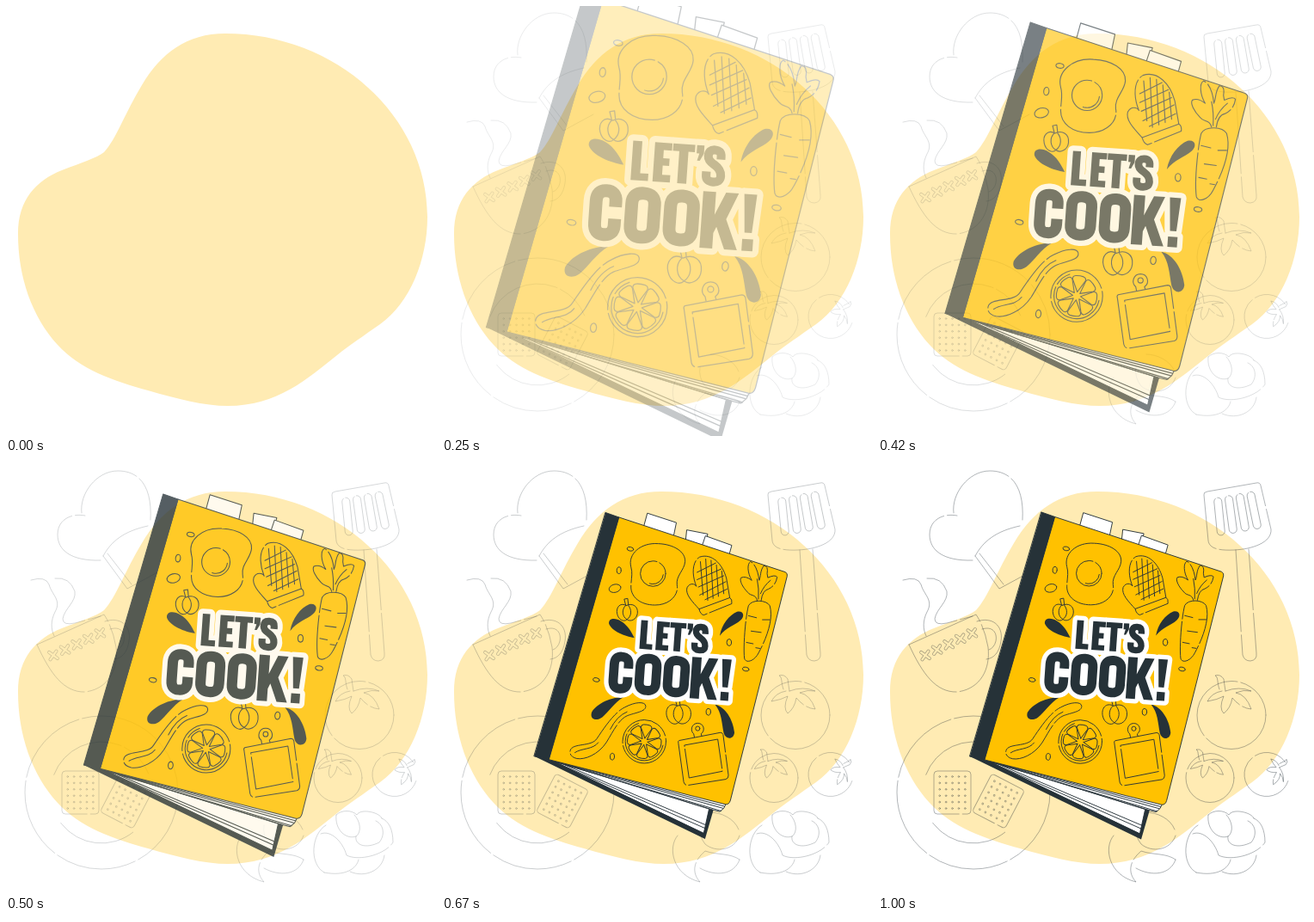
Animation of 500 by 500 pixels, one loop 1040 ms. Source, as an HTML page with a canvas:

```html
<!DOCTYPE html>
<html lang="en">
<head>
<meta charset="utf-8">
<title>Let's cook!</title>
<style>
html, body { margin: 0; width: 100%; height: 100%; overflow: hidden; background: #fff; }
canvas { display: block; width: 100vw; height: 100vh; }
</style>
</head>
<body>
<canvas id="stage" role="img" aria-label="LET'S COOK!"></canvas>
<script>
const SIZE = 500, LOOP = 1040, STEP = 1000 / 24;
const DARK = '#263238', YELLOW = '#ffc100', CREAM = '#ffebb3', WHITE = '#fff';
const CX = 257, CY = 249, BOOK_UNIT = 1.285;

const stage = document.getElementById('stage');
const view = stage.getContext('2d');
const sheet = document.createElement('canvas');
const g = sheet.getContext('2d');
let ratio = 1;

function resize() {
  ratio = Math.min(innerWidth, innerHeight) / SIZE * (window.devicePixelRatio || 1);
  stage.width = stage.height = sheet.width = sheet.height = Math.round(SIZE * ratio);
}

const cache = {};
const path = d => cache[d] || (cache[d] = new Path2D(d));
const fill = (d, color) => { g.fillStyle = color; g.fill(path(d)); };
const line = d => g.stroke(path(d));
const shape = (d, color) => { fill(d, color); line(d); };

function oval(x, y, rx, ry = rx, turn = 0, from = 0, to = Math.PI * 2) {
  g.beginPath();
  g.ellipse(x, y, rx, ry, turn, from, to);
  g.stroke();
}

function at(x, y, scale, turn, draw) {
  g.save();
  g.translate(x, y);
  g.rotate(turn);
  g.scale(scale, scale);
  draw();
  g.restore();
}

function pen(color, width) {
  g.strokeStyle = color;
  g.lineWidth = width;
  g.lineCap = g.lineJoin = 'round';
}

// Draws a group on its own sheet, then fades it in as a whole.
function layer(alpha, draw) {
  g.setTransform(1, 0, 0, 1, 0, 0);
  g.clearRect(0, 0, sheet.width, sheet.height);
  g.setTransform(ratio, 0, 0, ratio, 0, 0);
  g.save();
  draw();
  g.restore();
  view.globalAlpha = alpha;
  view.drawImage(sheet, 0, 0);
  view.globalAlpha = 1;
}

/* ---------- background ---------- */

function biscuit(x, y, turn) {
  at(x, y, 1, turn, () => {
    g.beginPath();
    g.roundRect(-21.5, -25, 43, 50, 4);
    g.stroke();
    for (let r = 0; r < 6; r++)
      for (let c = 0; c < 5; c++) oval((c - 2) * 7.4, (r - 2.5) * 7.4, 0.9);
  });
}

function leaf(x, y, scale, turn) {
  at(x, y, scale, turn, () => {
    g.lineWidth /= scale;
    line('M-11 -8C-14 -16 -12 -22 -16 -24Q-10 -26 -6 -20Q-5 -12 -4 -6');
    line('M-8 -6Q-20 -4 -25 6Q-13 4 -6 0Q-12 14 -6 20Q2 14 4 2Q14 14 26 15Q20 -2 8 -4Q17 -8 26 -6Q12 -12 -4 -6');
  });
}

function crosses() {
  const d = 'M-4.5 -4L4.5 4M4 -4.5L-4 4.5';
  for (let i = 0; i < 5; i++) at(55 + i * 13.6, 222.5 - i * 6.4, 1, -0.1, () => {
    g.lineWidth = 4;
    line(d);
    g.globalCompositeOperation = 'destination-out';
    g.strokeStyle = '#000';
    g.lineWidth = 2.4;
    line(d);
  });
}

function scenery() {
  pen('rgba(38,50,56,.4)', 0.9);
  crosses();
  g.setLineDash([95, 4]);

  // chef's hat
  line('M110 112C75 113 60 100 60 82C60 65 75 57 92 60');
  line('M88 57C85 35 105 8 130 8C158 8 170 30 168 65');
  line('M113 107L141 145L176 126M113 107C122 90 137 78 165 72M118 104L146 140');

  // steam and cup
  line('M29 135Q46 130 50 140C53 152 65 158 57 172C52 182 52 192 56 200');
  line('M57 133Q74 131 80 148C82 160 68 168 66 180Q66 188 80 185L110 177');
  line('M36 210L114 175Q124 190 128 213C131 240 118 262 92 265C68 266 52 245 36 210');
  line('M115 183C133 177 146 188 143 206C141 219 135 226 126 227M121 192C133 188 139 196 137 206Q135 214 129 216');

  // plate and biscuits
  oval(111, 382, 89);
  oval(111, 382, 59, 59, 0, 3.5, 5.9);
  oval(111, 382, 59, 59, 0, 0.9, 2.5);
  biscuit(86.5, 382, 0);
  biscuit(140, 392, 0.48);

  // spatula
  line('M379 36Q378 33 383 32L440 22Q444 21 445 25L457 76C458 91 436 99 414 100C393 101 385 97 384 89Z');
  for (let i = 0; i < 4; i++) at(397 + i * 13.4, 61 - i * 2.4, 1, -0.1 - i * 0.035, () => {
    g.beginPath();
    g.roundRect(-4.5, -22, 9, 44, 4.5);
    g.stroke();
  });
  line('M416 100L424 222Q426 229 433 229Q441 228 440 220L431 99');

  // tomatoes
  oval(411, 292, 40, 39.5);
  leaf(408, 270, 1, 0);
  oval(386, 365, 28, 28.5);
  leaf(382, 350, 0.75, 0);
  oval(452, 361, 26, 25.5, 0, 0.3, 5.7);
  leaf(464, 356, 0.58, 1.3);

  // croissants
  line('M274 432C262 446 268 478 300 486C290 475 292 462 306 450C320 455 335 452 346 460');
  line('M312 405C324 405 340 412 345 425M346 432C340 450 318 452 306 442Q298 432 300 420M346 460C340 478 318 480 300 470');
  line('M384 408C390 402 402 402 408 408C412 400 435 405 437 412M384 408C382 425 395 437 407 433C414 428 412 415 405 408');
  line('M407 433C405 443 418 448 434 440C442 430 438 418 430 415M372 420C355 430 352 465 370 475');
  line('M366 430C378 425 392 440 396 455C410 462 440 455 450 440C450 425 445 415 437 412');
  line('M370 475C395 480 408 470 410 460M440 455C438 472 418 482 400 474');
}

/* ---------- book ---------- */

function pepper(x, y, scale) {
  at(x, y, scale, 0, () => {
    g.lineWidth /= scale;
    line('M-1 -8C-10 -13 -16 -5 -14 4C-12 13 -4 16 0 12C5 16 14 12 15 3C16 -7 8 -12 -1 -8Z');
    line('M-2 -8C-8 -2 -7 8 0 12C7 7 7 -2 2 -8M-2 -9L-4 -17L1 -18L2 -9');
  });
}

function lemon(x, y) {
  oval(x, y, 32.5);
  oval(x, y, 28.5, 28.5, 0, 0.2, 4.4);
  for (let i = 0; i < 8; i++) at(x, y, 1, i * Math.PI / 4 + 0.15, () =>
    line('M5 0L20 -8Q24 -9 25 -5Q26 0 25 5Q24 9 20 8Z'));
}

function pages() {
  fill('M64 366L320 490L333 445L88 370Z', DARK);
  shape('M88 371L326 445L318 481Z', WHITE);
  line('M96 375L320 474M110 379L321 469');
  shape('M86 371L352 436L348 444L342 449L334 447Z', WHITE);
  line('M86 371L349 441M88 372L347 444M90 373L344 448');
}

function tabs() {
  shape('M234 2L277 16L272 40L228 24Z', WHITE);
  shape('M293 27L324 33L318 56L291 46Z', WHITE);
  shape('M321 36L360 50L355 68L315 54Z', WHITE);
}

function food() {
  g.setLineDash([95, 4]);
  line('M250 49C273 50 291 61 290 76C289 89 276 97 278 111C281 127 266 141 245 141C223 141 209 129 209 114C209 102 212 94 209 84C204 65 223 47 250 49Z');
  oval(242, 94, 19);
  oval(242, 94, 15.5, 15.5, 0, 0.1, 1.9);

  // oven mitt
  line('M311 147C301 136 290 125 293 115C297 107 305 109 307 113C300 96 300 76 312 69C330 63 346 79 352 101L357 130');
  line('M311 147L357 130Q361 132 360 139L318 156Q313 155 311 147Z');
  line('M313 76L317 126M321 72L324 134M329 74L332 131M337 81L340 128M345 90L348 124');
  line('M308 92L336 78M308 103L344 87M310 114L348 97M312 126L351 106M320 133L353 117');

  // carrot
  line('M385 142C390 132 412 133 417 142C423 162 412 191 400 213C394 225 381 229 379 221C377 205 380 162 385 142Z');
  line('M398 134C396 124 388 128 384 122C376 114 371 104 374 100Q381 97 390 104C383 92 383 79 388 76C396 79 400 94 401 104C404 98 402 90 408 82Q415 82 413 94L414 100Q425 95 428 99Q426 112 415 117Q406 119 404 134');
  line('M400 132Q401 116 398 102M403 124Q408 112 418 104M385 157L397 160M417 163L406 163M389 180L404 182M382 197L392 199M396 205L402 206');

  pepper(203, 150, 1.05);
  pepper(280, 302, 1.25);

  // spoon
  line('M118 359C121 347 150 354 158 341C170 323 185 301 200 294C215 286 230 285 231 292C232 301 215 302 203 307C190 313 182 331 172 347C160 365 140 373 128 371C119 369 117 364 118 359Z');
  line('M125 362C135 355 152 358 160 347M178 327Q188 307 203 301');

  lemon(229, 345.5);

  // chopping board
  line('M281 344L343 332Q346 332 347 335L355 396Q355 401 351 402L294 411Q289 411 288 406L280 348Q279 345 281 344Z');
  line('M289 351L339 342L346 390L296 400Z');
  line('M304 339L303 334C297 329 300 318 309 318C318 318 321 329 314 334L315 337');
  g.setLineDash([]);
  oval(309, 326, 3.3);

  [[208, 57, 5, 3, 0.2], [191, 89, 3.3, 5, 0.1], [185, 116, 9, 6, -0.25], [157, 253, 5, 3, 0.2],
   [181, 368, 3.3, 5, 0.1], [325, 301, 3.5, 5, 0.1], [356, 197, 3.5, 5, 0], [381, 237, 5, 3, 0.2]]
    .forEach(d => oval(...d));
}

function splashes() {
  fill('M214 190C200 188 180 180 176 169C175 160 186 160 194 165C204 171 209 180 214 190Z', DARK);
  fill('M342 187C345 170 356 156 368 151C378 149 380 158 373 164C364 172 352 174 342 187Z', DARK);
  fill('M198 279C180 279 158 288 150 302C147 313 158 315 166 309C175 302 184 287 198 279Z', DARK);
  fill('M335 290C350 293 362 312 364 332C363 343 351 343 348 333C345 318 345 302 335 290Z', DARK);
}

// Condensed poster lettering: straight glyphs are filled, round ones stroked.
const O = x => `M${x} -43Q${x} -55 ${x + 12.5} -55Q${x + 25} -55 ${x + 25} -43V-19Q${x + 25} -7 ${x + 12.5} -7Q${x} -7 ${x} -19Z`;
const WORDS = [
  { x: 221.5, y: 206.5, weight: 9.5,
    solid: 'M0 0V-43H10V-8H19V0ZM24 0V-43H43V-35H34V-26H41V-18H34V-8H43V0ZM44 -43H68V-35H61V0H51V-35H44ZM70 -43H78V-34L74 -26H71L73 -34H70Z',
    round: 'M97 -29V-32Q97 -39 90 -39Q83 -39 83 -32Q83 -27 90 -23Q98 -18 98 -11Q98 -4 90 -4Q82 -4 82 -11V-15' },
  { x: 174, y: 272, weight: 14,
    solid: 'M123 0V-62H137V-37L148 -62H162L150 -33L164 0H150L140 -24L137 -17V0ZM168 -62H182L179 -20H171ZM169 -13H181V0H169Z',
    round: 'M28.5 -38V-44Q28.5 -55 17.5 -55Q7 -55 7 -43V-19Q7 -7 17.5 -7Q28.5 -7 28.5 -18V-25' + O(46) + O(88.5) }
];

function title() {
  const HALO = 13.5;
  for (const w of WORDS) at(w.x, w.y, 1, 0.07, () => {
    pen(WHITE, HALO);
    line(w.solid);
    g.lineWidth = w.weight + HALO;
    line(w.round);
  });
  for (const w of WORDS) at(w.x, w.y, 1, 0.07, () => {
    fill(w.solid, DARK);
    g.strokeStyle = DARK;
    g.lineWidth = w.weight;
    g.lineCap = 'butt';
    line(w.round);
  });
}

function book(scale) {
  at(CX, CY, scale / BOOK_UNIT, 0, () => {
    g.translate(-CX, -CY);
    pen(DARK, 1.2);
    pages();
    tabs();
    shape('M191 8L440 90Q444 92 443 96L358 432Q356 439 350 438L86 371Z', YELLOW);
    shape('M171 1L191 8L86 371L64 366Z', DARK);
    g.translate(0, -1.5);
    food();
    splashes();
    title();
  });
}

/* ---------- timing ---------- */

// cubic-bezier(.36, -.01, .5, 1.38): overshoots, then settles
function ease(t) {
  const curve = (u, a, b) => 3 * (1 - u) * (1 - u) * u * a + 3 * (1 - u) * u * u * b + u * u * u;
  let lo = 0, hi = 1;
  for (let i = 0; i < 24; i++) {
    const mid = (lo + hi) / 2;
    if (curve(mid, 0.36, 0.5) < t) lo = mid; else hi = mid;
  }
  return curve(lo, -0.01, 1.38);
}

function render(ms) {
  const step = Math.floor((ms + 5) / STEP);
  view.setTransform(ratio, 0, 0, ratio, 0, 0);
  view.fillStyle = WHITE;
  view.fillRect(0, 0, SIZE, SIZE);
  view.fillStyle = CREAM;
  view.fill(path('M255 32C384 32 490 128 490 245C490 295 470 345 435 370C415 384 400 394 385 406C350 434 315 465 258 465C230 465 200 457 165 447C125 436 85 422 60 394C30 361 14 315 14 265C14 225 35 203 65 191C88 182 105 177 114 170C128 155 138 125 158 92C180 55 210 32 255 32Z'));
  if (step < 2) return;
  const t = Math.min(1, step / 24 + 0.02);
  const e = ease(t);
  view.setTransform(1, 0, 0, 1, 0, 0);
  layer(t, scenery);
  layer(Math.min(1, Math.max(0, e)), () => book(1.5 - 0.5 * e));
}

const start = performance.now();
function tick() {
  render((performance.now() - start) % LOOP);
  requestAnimationFrame(tick);
}

addEventListener('resize', resize);
resize();
tick();
</script>
</body>
</html>
```
